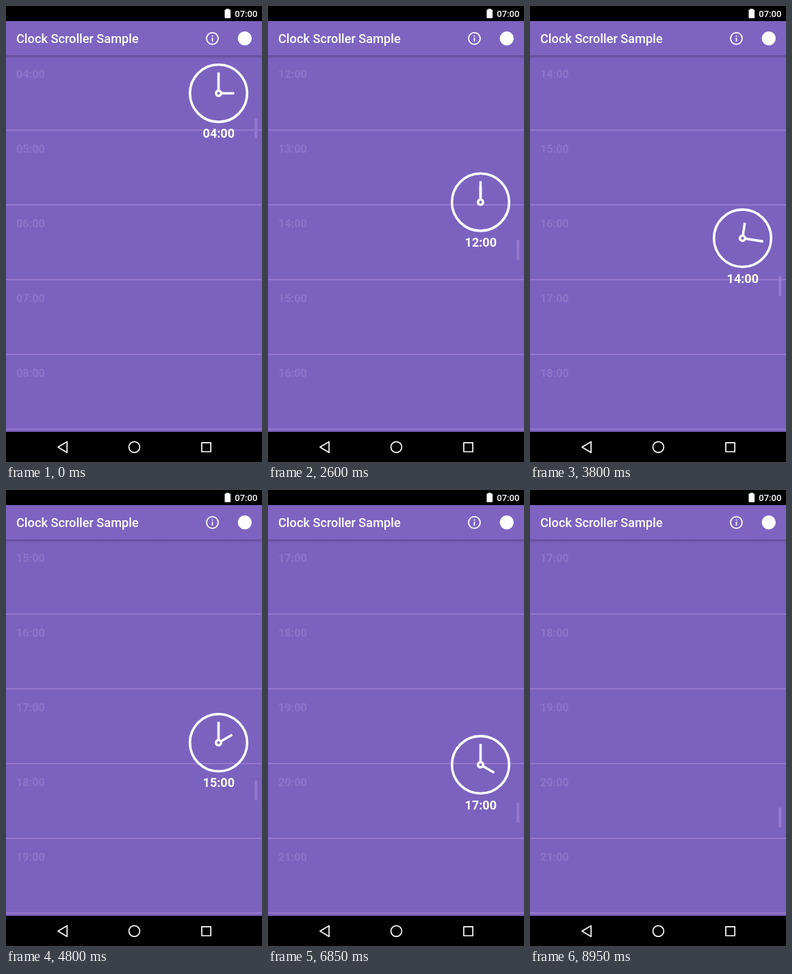
Write an HTML page with a canvas that moves like this. It is 374 by 665 pixels and loops after 9000 ms.

```html
<!DOCTYPE html>
<html lang="en">
<head>
<meta charset="utf-8">
<title>Clock Scroller Sample</title>
<style>
  html, body { margin: 0; width: 100%; height: 100%; overflow: hidden; background: #000; }
  canvas { display: block; width: 374px; height: 665px; }
</style>
</head>
<body>
<canvas id="stage"></canvas>
<script>
const W = 374, H = 665, LOOP = 9000, STEP = 50;
const BAR_TOP = 22, LIST_TOP = 72, LIST_END = 621, ROW = 109;
const HOUR_PX = 22;          // thumb travel per hour
const BG = '#7c62bf', LINE = '#9578ce', FAINT = '#8d74c8';

const canvas = document.getElementById('stage');
const scale = window.devicePixelRatio || 1;
canvas.width = W * scale;
canvas.height = H * scale;
const ctx = canvas.getContext('2d');
ctx.scale(scale, scale);

const easeInOut = x => (1 - Math.cos(Math.PI * x)) / 2;
const easeOut = x => Math.sin(x * Math.PI / 2);
const soft = x => x * (1.3 - 0.3 * x);

// Moves: [start ms, end ms, from, to, easing]
const thumbMoves = [
  [0, 600, 164, 338, soft],
  [600, 1000, 338, 341, easeOut],
  [2550, 3500, 341, 394, easeInOut],
  [4400, 4950, 394, 430, easeInOut],
  [6000, 6850, 430, 456, easeInOut],
  [6850, 7500, 456, 463, easeOut]
];
const handMoves = [
  [540, 2400, 3, 12, easeInOut],
  [3510, 4710, 12, 14, easeInOut],
  [4800, 6000, 14, 16, easeInOut],
  [6840, 8000, 16, 17, easeInOut]
];

function valueAt(moves, t) {
  let value = moves[0][2];
  for (const [start, end, from, to, ease] of moves) {
    if (t < start) break;
    value = from + (to - from) * ease(Math.min(1, (t - start) / (end - start)));
  }
  return value;
}

const hourText = h => String(h).padStart(2, '0') + ':00';

function text(str, x, y, font, color, align = 'left') {
  ctx.font = font + ' Roboto, sans-serif';
  ctx.fillStyle = color;
  ctx.textAlign = align;
  ctx.fillText(str, x, y);
}

function rect(x, y, w, h, color) {
  ctx.fillStyle = color;
  ctx.fillRect(x, y, w, h);
}

function circle(x, y, r, width) {
  ctx.beginPath();
  ctx.arc(x, y, r, 0, Math.PI * 2);
  if (width) {
    ctx.lineWidth = width;
    ctx.stroke();
  } else {
    ctx.fill();
  }
}

function drawList(first) {
  rect(0, LIST_TOP, W, LIST_END - LIST_TOP, BG);
  for (let i = 0; i < 5; i++) {
    text(hourText(first + i), 15, 105 + i * ROW, 'bold 16.2px', FAINT);
    rect(0, 180 + i * ROW, W, 2, LINE);
  }
}

function drawThumb(top) {
  ctx.fillStyle = LINE;
  ctx.beginPath();
  ctx.roundRect(363.2, top, 4, 29, 1);
  ctx.fill();
}

function drawHand(x, y, turns, length) {
  const a = turns * Math.PI * 2, dx = Math.sin(a), dy = -Math.cos(a);
  ctx.lineWidth = 3.6;
  ctx.beginPath();
  ctx.moveTo(x + dx * 4, y + dy * 4);
  ctx.lineTo(x + dx * length, y + dy * length);
  ctx.stroke();
}

function drawClock(y, time, label, alpha) {
  const x = 310.5;
  ctx.globalAlpha = alpha;
  ctx.strokeStyle = '#fff';
  circle(x, y, 41.8, 3.6);
  drawHand(x, y, time, 30.5);
  drawHand(x, y, time / 12, 23);
  circle(x, y, 3.8, 3.4);
  text(label, x + 0.3, y + 65, 'bold 18px', '#fff', 'center');
  ctx.globalAlpha = 1;
}

function drawHeader() {
  const shade = ctx.createLinearGradient(0, LIST_TOP, 0, LIST_TOP + 5);
  shade.addColorStop(0, 'rgba(0,0,0,.22)');
  shade.addColorStop(1, 'rgba(0,0,0,0)');
  rect(0, LIST_TOP, W, 5, shade);
  rect(0, BAR_TOP, W, LIST_TOP - BAR_TOP, '#7e63c1');
  text('Clock Scroller Sample', 15, 54, '500 18.2px', '#fff');

  ctx.strokeStyle = '#fff';
  circle(301.5, 47.3, 8.5, 1.8);
  rect(300.6, 42.8, 1.8, 1.8, '#fff');
  rect(300.6, 46.4, 1.8, 5.4, '#fff');
  circle(348.8, 47.3, 10.2);
}

function drawSystemBars() {
  rect(0, 0, W, BAR_TOP, '#000');
  rect(321.7, 4, 4, 2, '#fff');
  ctx.beginPath();
  ctx.roundRect(319.5, 5.3, 8.6, 12.4, 0.8);
  ctx.fill();
  text('07:00', 367.3, 16.3, '500 13px', '#fff', 'right');

  rect(0, LIST_END, W, H - LIST_END, '#000');
  ctx.strokeStyle = '#fff';
  ctx.lineWidth = 1.7;
  ctx.lineJoin = 'round';
  ctx.beginPath();
  ctx.moveTo(76, 643.3);
  ctx.lineTo(89.2, 635.4);
  ctx.lineTo(89.2, 651.2);
  ctx.closePath();
  ctx.stroke();
  circle(187.5, 643.3, 7.9, 1.7);
  ctx.strokeRect(286, 636.8, 13.2, 13.2);
}

function draw(t) {
  const top = valueAt(thumbMoves, t);
  const hour = Math.floor((top - LIST_TOP) / HOUR_PX);
  const alpha = Math.max(0, Math.min(1, (8950 - t) / 700));
  drawList(hour);
  drawThumb(top);
  drawHeader();
  drawClock(Math.max(127.3, top - 55.3), valueAt(handMoves, t), hourText(hour), alpha);
  drawSystemBars();
}

const begin = performance.now();
function frame() {
  const t = (performance.now() - begin) % LOOP;
  draw(Math.floor(t / STEP) * STEP);
  requestAnimationFrame(frame);
}
frame();
</script>
</body>
</html>
```
